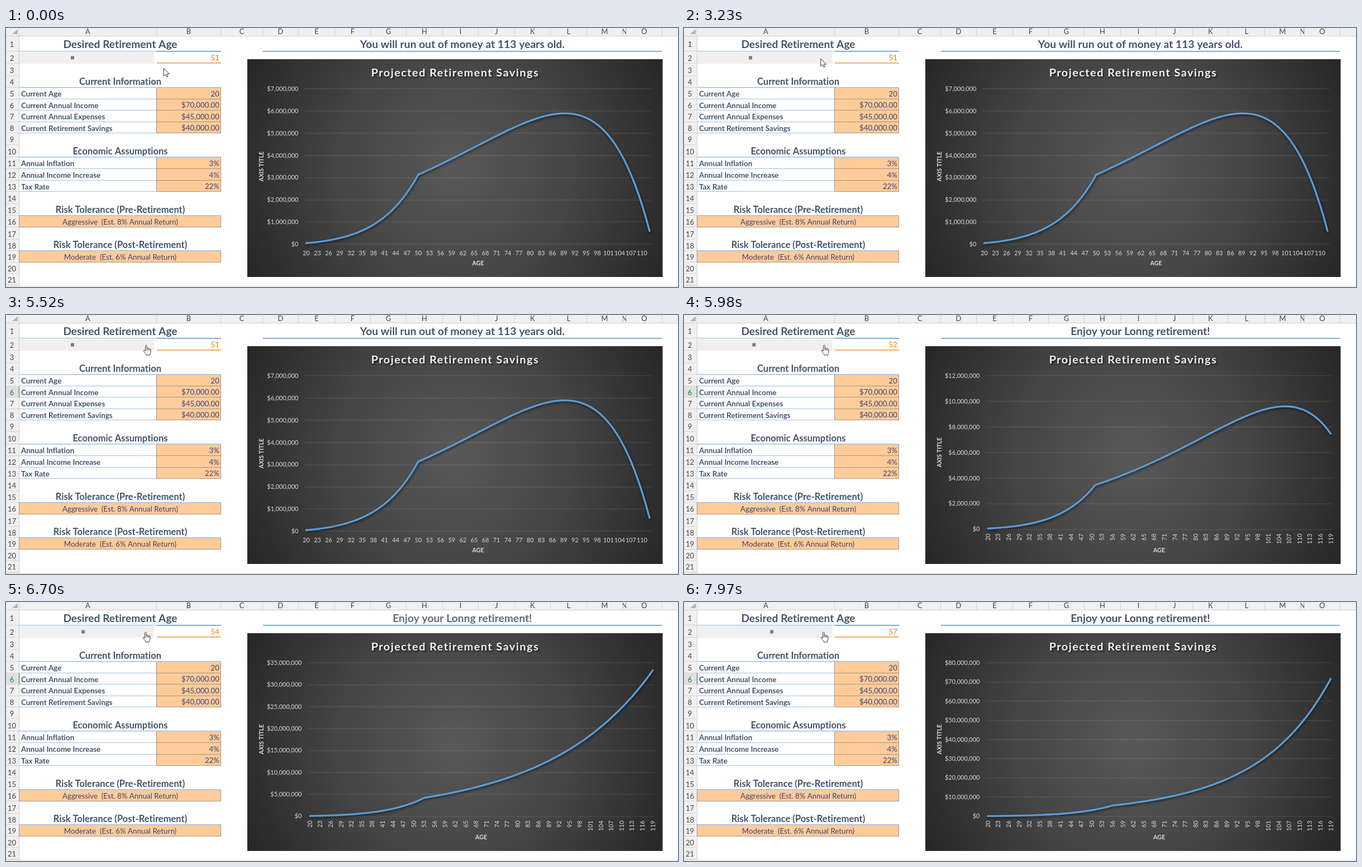
These frames come from a looping animation (1203 by 465 pixels, 8000 ms). An HTML page with a canvas:

```html
<!DOCTYPE html>
<html lang="en">
<head>
<meta charset="utf-8">
<title>Retirement calculator</title>
<style>
html, body { margin: 0; width: 100%; height: 100%; overflow: hidden; background: #fff; }
canvas { display: block; }
</style>
</head>
<body>
<canvas id="stage" width="1203" height="465"></canvas>
<script>
const ctx = document.getElementById('stage').getContext('2d');
const LOOP = 8000, MORPH = 300;
const BLUE = '#5b9bd5', PALE = '#9bc2e6', SLATE = '#44546a', INPUT = '#3f3f76', ORANGE = '#fa7d00';

// Moments at which the retirement age goes up by one, starting from 51.
const FIRST_AGE = 51;
const STEPS = [5640, 6060, 6400, 6760, 7360, 7660];

// Axis maximum and tick size in millions, by retirement age.
const SCALE = { 51: [7, 1], 52: [12, 2], 53: [25, 5], 54: [35, 5], 55: [50, 5], 56: [70, 10], 57: [80, 10] };

const ROWS = [15, 42, 64, 86, 107, 128, 148, 169, 189, 210, 232, 253, 274, 294, 316, 337, 358, 380, 400, 421, 441, 462];
const COLS = [24, 270, 385, 460, 524, 589, 653, 717, 782, 846, 911, 975, 1040, 1104, 1111, 1175];

// Time, x, y of the pointer tip; it glides only during the sweep.
const ARROW = [
  [0, 282.5, 72.5], [290, 282.5, 72.3], [1020, 282.5, 73.8], [1550, 279.5, 74], [1890, 279.5, 74.2],
  [2350, 281, 74], [2430, 287, 73], [2560, 268, 65], [2690, 215, 58], [2760, 191.5, 57],
  [2840, 203, 57], [2960, 232, 56], [3090, 243.5, 55.4], [3230, 244.8, 55.2],
  [4550, 245.2, 54.8], [4690, 246, 54.5]
];
const SWEEP = [2350, 3090];
const HAND_AT = 5310, SELECT_AT = 4960;

const lerp = (a, b, k) => a + (b - a) * k;
const clamp01 = k => Math.max(0, Math.min(1, k));
const ease = k => k * k * (3 - 2 * k);

// Any letter spacing, however small, keeps ligatures off.
function text(s, x, cy, size, color, align = 'left', weight = 400, spacing = 0.01) {
  ctx.font = `${weight} ${size}px Lato, Carlito, sans-serif`;
  ctx.letterSpacing = `${spacing}px`;
  ctx.fillStyle = color;
  ctx.textAlign = align;
  ctx.fillText(s, x, cy + size * 0.36);
}

function upright(s, x, y, size, color, align, weight) {
  ctx.save();
  ctx.translate(x, y);
  ctx.rotate(-Math.PI / 2);
  text(s, 0, 0, size, color, align, weight);
  ctx.restore();
}

function box(x, y, w, h, color) {
  ctx.fillStyle = color;
  ctx.fillRect(x, y, w, h);
}

function drawHeaders(selected) {
  box(0, 0, 1203, 14, '#f0f0f0');
  box(0, 0, 24, 465, '#f0f0f0');
  box(0, 14, 1203, 1, '#cfcfcf');
  box(23, 0, 1, 465, '#cfcfcf');
  ctx.fillStyle = '#b4b4b4';
  ctx.beginPath();
  ctx.moveTo(21, 2); ctx.lineTo(21, 11); ctx.lineTo(11, 11);
  ctx.fill();

  COLS.forEach((x, i) => {
    box(x - 1, 0, 1, 14, '#d4d4d4');
    const right = COLS[i + 1];
    if (!right) return;
    ctx.save();
    ctx.beginPath();
    ctx.rect(x, 0, right - x - 1, 14);
    ctx.clip();
    text('ABCDEFGHIJKLMNO'[i], (x + right) / 2 - 0.5, 6, 13, '#444', 'center');
    ctx.restore();
  });

  for (let r = 1; r < ROWS.length; r++) {
    const top = ROWS[r - 1], bottom = ROWS[r], on = r === 6 && selected;
    if (on) {
      box(0, top, 23, bottom - top, '#e0e0e0');
      box(23, top, 1, bottom - top, '#217346');
    }
    box(0, bottom - 1, 23, 1, '#d4d4d4');
    text(String(r), 10.5, (top + bottom) / 2 + 1, 13, on ? '#217346' : '#444', 'center');
  }
  box(0, 463, 1203, 1, '#d9d9d9');
}

function inputCell(x, y, w, h) {
  box(x, y, w, h, '#ffcc99');
  ctx.strokeStyle = '#a09486';
  ctx.lineWidth = 1;
  ctx.strokeRect(x - 0.5, y - 0.5, w, h);
}

function table(title, titleY, first, rows) {
  text(title, 204.5, titleY, 16.5, SLATE, 'center', 700);
  rows.forEach(([label, value], i) => {
    const top = ROWS[first - 1 + i], h = ROWS[first + i] - top, cy = top + h / 2 + 0.7;
    inputCell(270, top, 115, h);
    box(24, top + h - 1, 246, 1, PALE);
    text(label, 27, cy, 13.4, SLATE, 'left', 700);
    text(value, 382, cy, 13.3, INPUT, 'right');
  });
  box(24, ROWS[first - 1] - 1, 361, 1.5, PALE);
}

function choice(title, titleY, row, value) {
  const top = ROWS[row - 1], h = ROWS[row] - top;
  text(title, 204.5, titleY, 16.5, SLATE, 'center', 700);
  inputCell(24, top, 361, h);
  box(24, top - 1, 361, 1.5, PALE);
  text(value, 204.5, top + h / 2 + 0.8, 13.3, INPUT, 'center');
}

function drawSheet(age, bump) {
  text('Desired Retirement Age', 204.5, 29, 19.2, SLATE, 'center', 700);
  box(24, 41, 361, 1, PALE);
  box(24, 42, 241, 22, '#f0f0f0');
  box(116 + 6.35 * (age - FIRST_AGE), 50.5, 6, 6, '#7b7b7b');
  box(270, 41, 115, 1.6, BLUE);
  box(270, 62, 115, 1.6, '#f59a45');
  if (bump) box(270, 59, 115, 1, '#f59a45');
  text(String(age), 382, bump ? 50.3 : 53.3, 13.3, ORANGE, 'right');

  table('Current Information', 96, 5, [
    ['Current Age', '20'],
    ['Current Annual Income', '$70,000.00'],
    ['Current Annual Expenses', '$45,000.00'],
    ['Current Retirement Savings', '$40,000.00']
  ]);
  table('Economic Assumptions', 221, 11, [
    ['Annual Inflation', '3%'],
    ['Annual Income Increase', '4%'],
    ['Tax Rate', '22%']
  ]);
  choice('Risk Tolerance (Pre-Retirement)', 326, 16, 'Aggressive  (Est. 8% Annual Return)');
  choice('Risk Tolerance (Post-Retirement)', 389.5, 19, 'Moderate  (Est. 6% Annual Return)');
}

// Savings in millions for each age until 119 or until they run out.
function savings(retireAge) {
  const out = [];
  let sum = 40000, pay = 70000 * 0.78, cost = 45000;
  for (let age = 20; age < 120; age++) {
    sum = age < retireAge ? sum * 1.08 + pay - cost : sum * 1.06 - cost;
    if (sum < 0) break;
    out.push(sum / 1e6);
    pay *= 1.04;
    cost *= 1.03;
  }
  return out;
}

function makePlot(age) {
  const data = savings(age), long = data.length === 100, max = SCALE[age][0];
  const p = long
    ? { left: 541, right: 1161, x0: 544, dx: 6.2, bottom: 384.5, labelX: 529.5, ageX: 850.5, axisY: 246.5 }
    : { left: 534, right: 1156, x0: 537.5, dx: 6.68, bottom: 388.3, labelX: 523.5, ageX: 845, axisY: 248.5 };
  const yOf = v => p.bottom - v / max * (p.bottom - 109.3);
  const points = data.map((v, i) => [p.x0 + i * p.dx, yOf(v)]);
  return { ...p, long, max, tick: SCALE[age][1], yOf, points };
}

const plots = {};
for (const age in SCALE) plots[age] = makePlot(+age);

function drawAxes(p, alpha) {
  if (alpha <= 0) return;
  const ink = '#d9d9d9';
  ctx.save();
  ctx.globalAlpha = alpha;
  for (let v = 0; v <= p.max; v += p.tick) {
    const y = p.yOf(v);
    box(p.left, Math.round(y) - 0.5, p.right - p.left, 1, 'rgba(255,255,255,.13)');
    text(v ? `$${v},000,000` : '$0', p.labelX, y - 0.2, 11, ink, 'right');
  }
  p.points.forEach(([x], i) => {
    if (i % 3) return;
    if (p.long) upright(String(20 + i), x, 392.5, 10.8, ink, 'right');
    else if (i <= 90) text(String(20 + i), x, 404, 10.8, ink, 'center');
  });
  text('AGE', p.ageX, 422.5, 10.7, ink, 'center', 700);
  upright('AXIS TITLE', 457, p.axisY, 10.7, ink, 'center', 700);
  ctx.restore();
}

function shadow(dx, dy, blur) {
  ctx.shadowColor = 'rgba(0,0,0,.6)';
  ctx.shadowOffsetX = dx;
  ctx.shadowOffsetY = dy;
  ctx.shadowBlur = blur;
}

function drawChart(from, to, k) {
  const glow = ctx.createRadialGradient(803.5, 251, 0, 803.5, 251, 420);
  glow.addColorStop(0, '#595959');
  glow.addColorStop(0.5, '#454545');
  glow.addColorStop(1, '#262626');
  box(432, 56, 743.5, 391, glow);

  ctx.save();
  shadow(2, 2, 3);
  text('Projected Retirement Savings', 804, 80, 19.9, '#f2f2f2', 'center', 700, 1.45);
  ctx.restore();

  drawAxes(from, 1 - k);
  if (to !== from) drawAxes(to, k);

  ctx.save();
  shadow(1, 2, 4);
  ctx.strokeStyle = BLUE;
  ctx.lineWidth = 3.4;
  ctx.lineCap = ctx.lineJoin = 'round';
  ctx.beginPath();
  const shown = k > 0 ? to.points : from.points, last = from.points.length - 1;
  shown.forEach(([x, y], i) => {
    const [fx, fy] = from.points[Math.min(i, last)];
    ctx.lineTo(lerp(fx, x, k), lerp(fy, y, k));
  });
  ctx.stroke();
  ctx.restore();
}

function outline(path, x, y) {
  ctx.save();
  ctx.translate(x, y);
  ctx.fillStyle = '#fff';
  ctx.strokeStyle = '#333';
  ctx.lineWidth = 1;
  ctx.lineJoin = 'round';
  ctx.fill(path);
  ctx.stroke(path);
  ctx.restore();
}

const arrowShape = new Path2D('M0 0V13.5L3.2 10.6L5.4 15.6L7.6 14.6L5.4 9.9H9.8Z');
const handShape = new Path2D('M3.6 11V1.6C3.6-.4 6.2-.4 6.2 1.6V6C6.6 4.9 8.4 5.1 8.6 6.3C9.2 5.4 10.7 5.8 10.8 7C11.6 6.2 13 6.8 13 8.2V12C13 14.4 11.6 15.2 11.4 18H5.2C4.9 15.6 1.8 13.4.6 10.8C-.1 9.2 1.6 8.6 2.4 9.6Z');
const knuckles = new Path2D('M6.2 6V9.5M8.6 6.5V9.6M10.8 7.2V9.8');

function drawPointer(t) {
  if (t >= HAND_AT) {
    const x = t < 5370 ? 244.5 : t < 6400 ? 246 : 245, y = 54;
    outline(handShape, x, y);
    outline(knuckles, x, y);
    return;
  }
  let i = ARROW.length - 1;
  while (ARROW[i][0] > t) i--;
  let [t0, x, y] = ARROW[i];
  if (t >= SWEEP[0] && t < SWEEP[1]) {
    const [t1, x1, y1] = ARROW[i + 1], k = (t - t0) / (t1 - t0);
    x = lerp(x, x1, k);
    y = lerp(y, y1, k);
  }
  outline(arrowShape, x, y);
}

function draw(t) {
  const count = STEPS.filter(s => s <= t).length;
  const age = FIRST_AGE + count;
  const since = count ? t - STEPS[count - 1] : Infinity;
  const prev = count ? age - 1 : age;
  const dim = count > 0 && STEPS.some(s => t >= s - 70 && t < s + 70);

  box(0, 0, 1203, 465, '#fff');
  drawHeaders(t >= SELECT_AT);
  drawSheet(age, since < 70);

  const message = count ? 'Enjoy your Lonng retirement!' : 'You will run out of money at 113 years old.';
  text(message, 817, 29, 19.3, dim ? '#5f6c80' : SLATE, 'center', 700);
  box(460, 41, 714, 1.6, BLUE);

  drawChart(plots[prev], plots[age], count ? ease(clamp01(since / MORPH)) : 0);
  drawPointer(t);
}

function frame() {
  draw(performance.now() % LOOP);
  requestAnimationFrame(frame);
}
frame();
</script>
</body>
</html>
```
